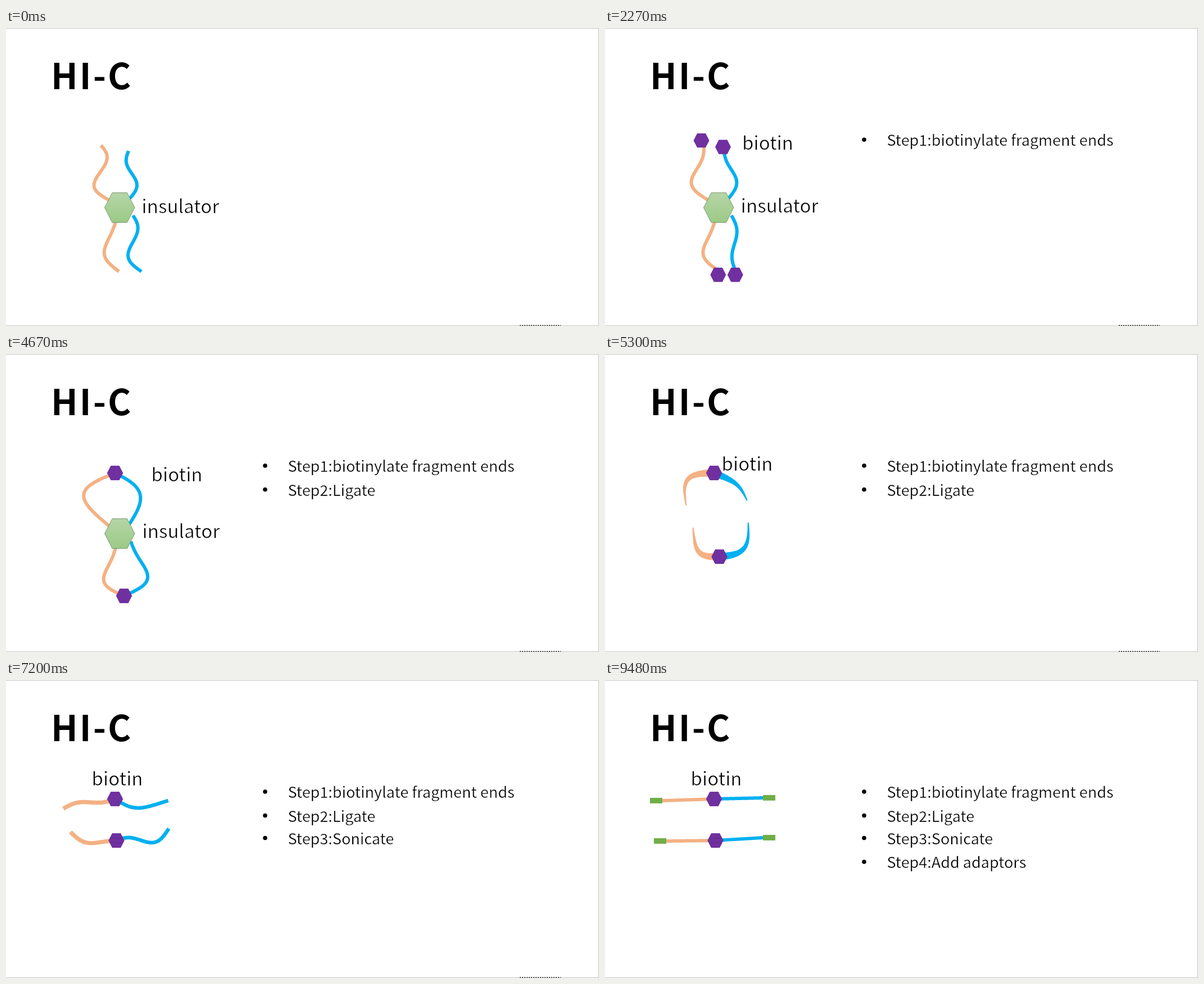
These frames come from a looping animation (1055 px wide and 531 px high, 9600 ms). An HTML page:

```html
<!DOCTYPE html>
<html lang="en">
<head>
<meta charset="utf-8">
<title>HI-C</title>
<style>
  html, body { margin: 0; width: 100%; height: 100%; overflow: hidden; background: #fff; }
  svg { display: block; width: 1055px; height: 531px; }
  text { font: 33px "Noto Sans CJK SC", "Noto Sans CJK JP", "Noto Sans", sans-serif; letter-spacing: .1px; stroke: #fff; stroke-width: .6px; }
  .step { font-size: 27px; letter-spacing: 0; stroke-width: .4px; }
  .title { font-size: 63px; font-weight: 700; letter-spacing: 3.1px; stroke: none; }
</style>
</head>
<body>
<svg id="stage" viewBox="0 0 1055 531">
  <defs>
    <linearGradient id="leaf" x1="0" y1="0" x2="0" y2="1">
      <stop offset="0" stop-color="#b5d5a7"/>
      <stop offset="1" stop-color="#9cca86"/>
    </linearGradient>
  </defs>
  <path d="M0 .5H1054.5V530.5H0" fill="none" stroke="#c3c3c3"/>
  <path id="dots" d="M914 530H987" stroke="#555" stroke-width="2" stroke-dasharray="2 2"/>
  <text class="title" x="80" y="109">HI-C</text>
</svg>
<script>
const LOOP = 9600, MORPH = 2050, STARTS = [1910, 4670, 7130];
const ORANGE = '#f4b183', BLUE = '#00b0f0', PURPLE = '#7030a0', GREEN = '#70ad47';
const TOP = [194, 212], BOTTOM = [210, 431], RAISED = [196.5, 286];
const stage = document.getElementById('stage');
const dots = document.getElementById('dots');

function add(tag, attrs, parent = stage) {
  const el = document.createElementNS('http://www.w3.org/2000/svg', tag);
  for (const name in attrs) el.setAttribute(name, attrs[name]);
  return parent.appendChild(el);
}
function label(content, x, y, cls = '', parent = stage) {
  const el = add('text', { x, y, class: cls }, parent);
  el.textContent = content;
  return el;
}
const clamp = v => Math.min(1, Math.max(0, v));
const mix = (a, b, k) => a + (b - a) * k;

// Value of a list of layouts at stage s; the last layout holds.
function at(list, s) {
  const last = list.length - 1, i = Math.min(Math.floor(s), last);
  const next = list[Math.min(i + 1, last)];
  return list[i].map((v, n) => mix(v, next[n], s - Math.floor(s)));
}

// A strand runs from its biotin tip to its root; each bend is [bow, wave].
const strands = [
  { color: ORANGE, hex: [163, 196],
    tips: [[169, 209], TOP],
    roots: [[184, 307], [184, 307], [102, 230], [102, 215]],
    bends: [[-11, 15], [-51, -3], [-3, 4], [0, 0]] },
  { color: BLUE, hex: [216, 212],
    tips: [[218, 219], TOP],
    roots: [[219, 305], [219, 304], [289, 215], [281, 210]],
    bends: [[7, -9], [33, 0], [-15, -2], [0, 0]] },
  { color: ORANGE, hex: [198, 443],
    tips: [[201, 434], BOTTOM, RAISED],
    roots: [[195, 346], [195, 346], [115, 270], [109, 287]],
    bends: [[22, 5], [28, 7], [13, -3], [0, 0]] },
  { color: BLUE, hex: [240, 443],
    tips: [[241, 434], BOTTOM, RAISED],
    roots: [[226, 334], [222, 334], [290, 264], [281, 281]],
    bends: [[10, 12], [-34, -9], [-13, 9], [0, 0]] }
];
for (const strand of strands) strand.el = add('path', { fill: strand.color });

const insulator = add('g', {});
add('path', { d: 'M175.5 320L189 293.5H215.5L229 320L215.5 346.5H189Z', fill: 'url(#leaf)', stroke: '#64855a', 'stroke-width': .8 }, insulator);
const insulatorText = label('insulator', 241.5, 330, '', insulator);

const hexes = strands.map(({ hex, tips }) => ({
  spots: [hex, ...tips.slice(1)],
  el: add('path', { d: 'M-14 0L-7.5 -12.7H7.5L14 0L7.5 12.7H-7.5Z', fill: PURPLE })
}));
const seam = add('path', { d: 'M-11 -4H11M-11 4H11', stroke: '#4a2a66', 'stroke-opacity': .6 });
const biotin = label('biotin', 0, 0);
const biotinSpots = [[238.5, 213], [258.5, 227], [152.5, 187.5]];

const steps = [
  ['Step1:biotinylate fragment ends', 210],
  ['Step2:Ligate', 252.5],
  ['Step3:Sonicate', 292.5],
  ['Step4:Add adaptors', 335]
].map(([content, y]) => {
  const g = add('g', {});
  add('circle', { cx: 461, cy: y - 11, r: 3.8 }, g);
  label(content, 501.5, y, 'step', g);
  return g;
});

const adaptors = add('g', { fill: GREEN });
for (const { color, roots } of strands) {
  const [x, y] = roots[3];
  add('rect', { x: color === BLUE ? x : x - 22, y: y - 5, width: 22, height: 9.8 }, adaptors);
}

const ease = t => 1 - (1 - t ** 1.15) ** 2.2;
const fadeIn = t => clamp((t - .46) / .5) ** .42;
const show = (el, opacity) => el.setAttribute('opacity', opacity);
const place = (el, [x, y]) => el.setAttribute('transform', `translate(${x} ${y})`);

// Strands swell midway: tapering while they open, evenly while they straighten.
function strandWidth(color, s, u) {
  const swell = Math.sin(Math.PI * (s % 1));
  if (s < 1) return 6;
  if (s < 2) return 6 + swell * mix(8, -4, u);
  return 6 + swell * (color === ORANGE ? 10 : 4);
}

function ribbon({ color, tips, roots, bends }, s) {
  const [x0, y0] = at(tips, s), [x1, y1] = at(roots, s), [bow, wave] = at(bends, s);
  const dx = x1 - x0, dy = y1 - y0, length = Math.hypot(dx, dy);
  const left = [], right = [], count = 40;
  for (let n = 0; n <= count; n++) {
    const u = n / count, a = Math.PI * u;
    const off = (bow * Math.sin(a) + wave * Math.sin(2 * a)) / length;
    const slope = Math.PI * (bow * Math.cos(a) + 2 * wave * Math.cos(2 * a)) / length;
    const x = mix(x0, x1, u) + dy * off, y = mix(y0, y1, u) - dx * off;
    const tx = dx + dy * slope, ty = dy - dx * slope;
    const k = strandWidth(color, s, u) / 2 / Math.hypot(tx, ty);
    left.push(`${(x - ty * k).toFixed(2)} ${(y + tx * k).toFixed(2)}`);
    right.unshift(`${(x + ty * k).toFixed(2)} ${(y - tx * k).toFixed(2)}`);
  }
  return `M${left.concat(right).join('L')}Z`;
}

function draw(time) {
  const raw = STARTS.map(start => clamp((time - start) / MORPH));
  const s = raw.reduce((sum, t) => sum + ease(t), 0);
  const intro = time < 840 ? 0 : clamp((time - 780) / 180);

  for (const strand of strands) strand.el.setAttribute('d', ribbon(strand, s));
  for (const { el, spots } of hexes) {
    place(el, at(spots, s));
    show(el, intro);
  }
  place(seam, at(hexes[2].spots, s));
  show(seam, clamp((s - 1.6) / .3));
  place(biotin, at(biotinSpots, s));
  show(biotin, intro);

  place(insulatorText, [clamp(s), -2 * clamp(s)]);
  show(insulator, clamp(1 - raw[1] / .25));
  steps.forEach((step, i) => show(step, i ? fadeIn(raw[i - 1]) : intro));
  show(adaptors, fadeIn(raw[2]));
  show(dots, time < 9480 ? 1 : 0);
}

function tick() {
  draw(performance.now() % LOOP);
  requestAnimationFrame(tick);
}
tick();
</script>
</body>
</html>
```
